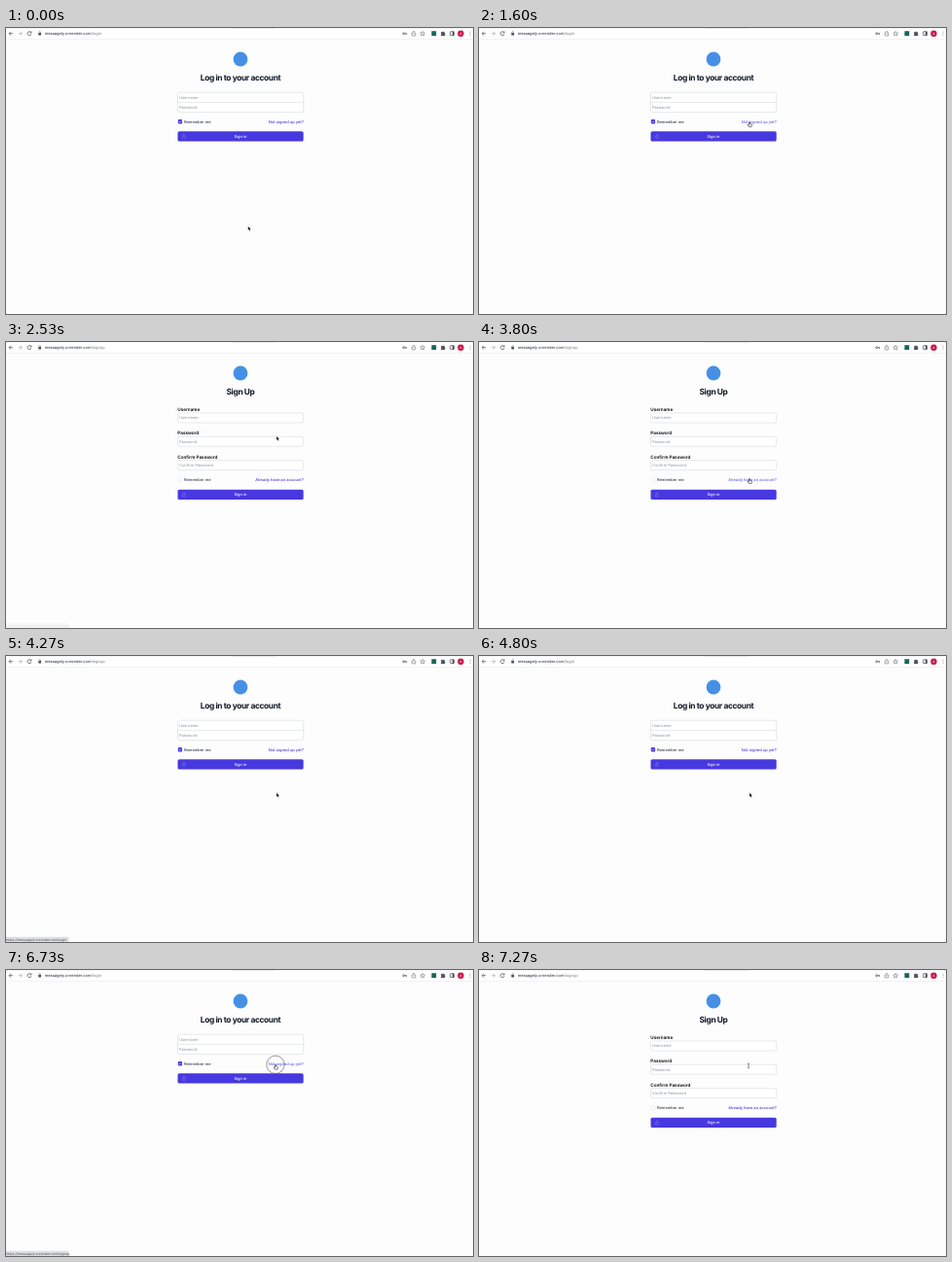
Recreate the animation shown at these times as an HTML page. Size 480 by 294 pixels, loop 7.74 s.

```html
<!DOCTYPE html>
<html lang="en">
<head>
<meta charset="utf-8">
<title>Log in and sign up</title>
<style>
  html, body { margin: 0; width: 100%; height: 100%; overflow: hidden; background: #fdfdfd; }
  svg { display: block; width: 100%; height: 100%; }
  text { font: 4.03px Inter, sans-serif; fill: #1b2130; text-rendering: geometricPrecision; }
  .title { font-size: 8.4px; font-weight: 700; letter-spacing: -.045em; text-anchor: middle; fill: #111827; }
  .label { font-size: 4.61px; font-weight: 600; fill: #000; }
  .hint { fill: #8d929c; }
  .link { font-weight: 500; fill: #4838df; text-anchor: end; }
  .button { fill: #4838df; }
  .link.hover, .button.hover { fill: #6062ef; }
  .caption { font-weight: 500; fill: #fff; text-anchor: middle; }
  .field { fill: #fff; stroke: #cdd0d6; stroke-width: .5; }
  .lock { fill: none; stroke: #7f7bf2; stroke-width: .5; }
  .icon { fill: none; stroke: #50545a; stroke-width: .75; }
  .solid { fill: #50545a; stroke: none; }
</style>
</head>
<body>
<svg viewBox="0 0 480 294">
  <rect width="480" height="294" fill="#fdfdfd"/>

  <g id="toolbar">
    <rect width="480" height="11.5" fill="#fff"/>
    <path d="M0 .3H480" stroke="#eceef0" stroke-width=".6"/>
    <path d="M232 .3H276" stroke="#d9dce0" stroke-width=".6"/>
    <path d="M0 11.6H480" stroke="#e4e5e7" stroke-width=".5"/>
    <g class="icon">
      <path d="M7 5.7H3.2M5 3.8 3.1 5.7 5 7.6"/>
      <path d="M12.6 5.7H16.4M14.6 3.8 16.5 5.7 14.6 7.6" stroke="#a9acb0"/>
      <path d="M25.6 4.4A2 2 0 1 0 26 6.2M26.1 3.4V4.9H24.5"/>
      <path d="M33.9 5.2V4.4a.8 .8 0 0 1 1.6 0V5.2" stroke-width=".5"/>
      <rect class="solid" x="33.3" y="5.1" width="2.8" height="2.5" rx=".3"/>
      <circle cx="408.7" cy="5.7" r="1"/>
      <path d="M409.7 5.7H412M411.4 5.7V6.9"/>
      <path d="M418 5H417.2V7.9H420.8V5H420M419 6.2V3.3M418 4.3 419 3.3 420 4.3" stroke-width=".5"/>
      <path d="M428.2 3.4 428.9 5 430.6 5.1 429.3 6.2 429.7 7.9 428.2 7 426.7 7.9 427.1 6.2 425.8 5.1 427.5 5Z" stroke-width=".5"/>
      <path class="solid" d="M447 4.3H448.2a.8 .8 0 0 1 1.6 0H451V5.6a.8 .8 0 0 1 0 1.5V8H447V6.7a.6 .6 0 0 0 0-1.2Z"/>
      <rect x="456.6" y="3.7" width="3.9" height="3.9" rx=".4"/>
      <path class="solid" d="M458.8 3.7H460.5V7.6H458.8Z"/>
    </g>
    <rect x="437.4" y="3.2" width="4.8" height="4.8" fill="#17665a"/>
    <circle cx="467.4" cy="5.7" r="3.2" fill="#ca1748"/>
    <text x="467.4" y="6.9" text-anchor="middle" style="font-size:3.3px;fill:#fff">A</text>
    <g class="solid"><circle cx="477" cy="4" r=".45"/><circle cx="477" cy="5.7" r=".45"/><circle cx="477" cy="7.4" r=".45"/></g>
    <text id="address" x="39.7" y="7.2"><tspan>messagely.onrender.com</tspan><tspan id="route" fill="#73777d"></tspan></text>
  </g>

  <circle cx="241" cy="32" r="7.4" fill="#4590e6"/>
  <g id="login"></g>
  <g id="signup"></g>

  <g id="status">
    <path d="M0 288.8H63.4Q64.6 288.8 64.6 290V294H0Z" fill="#dcdee2"/>
    <text id="statusText" x=".3" y="292.5" style="font-size:3.46px;fill:#4b4f55"></text>
  </g>

  <g id="pointer">
    <circle id="ring" r="9.2" fill="none" stroke="#555" stroke-width=".6"/>
    <path id="arrow" d="M0 0V4.3L1 3.4 1.7 5 2.5 4.7 1.8 3.1H3.1Z" fill="#000" stroke="#fff" stroke-width=".3"/>
    <path id="hand" d="M-.5 0Q0-.6 .5 0V1.8L2.2 2.2Q2.8 2.5 2.6 3.2L2 4.8H-.6L-2 2.9Q-1.6 2.2-.5 3Z" fill="#fff" stroke="#000" stroke-width=".5"/>
    <path id="beam" d="M-.9-1.3Q0-1.3 0-.7Q0-1.3 .9-1.3M0-.7V2.9M-.9 3.5Q0 3.5 0 2.9Q0 3.5 .9 3.5" fill="none" stroke="#333" stroke-width=".55"/>
  </g>
</svg>
<script>
const LOOP = 7740, STEP = 200 / 3;
const $ = id => document.getElementById(id);
const show = (el, on) => { el.style.display = on ? '' : 'none'; };
const clamp = v => Math.max(0, Math.min(1, v));

const text = (cls, x, y, str) => `<text class="${cls}" x="${x}" y="${y}">${str}</text>`;
const box = (cls, y, h) => `<rect class="${cls}" x="176.5" y="${y}" width="129.2" height="${h}" rx="1.6"/>`;

const labelled = (name, y) =>
  text('label', 176.3, y, name) + box('field', y + 1.9, 10) + text('hint', 178, y + 8.3, name);

// Remember-me row and the submit button, shared by both forms.
function formEnd(y, link, checked) {
  const tick = checked ? `<path d="M177.7 ${y} l.8 .8 1.5-1.7" fill="none" stroke="#fff" stroke-width=".6"/>` : '';
  return `<rect x="176.8" y="${y - 2.2}" width="4.3" height="4.3" rx=".8"
      fill="${checked ? '#4838df' : '#fff'}" stroke="${checked ? 'none' : '#d6d9de'}" stroke-width=".4"/>` + tick +
    text('', 183, y + 1.4, 'Remember me') + text('link', 305.8, y + 1.4, link) +
    box('button', y + 9.9, 10.3) + text('caption', 241, y + 16.5, 'Sign in') +
    `<g class="lock"><rect x="181.4" y="${y + 14.8}" width="3" height="2.3" rx=".3"/>
      <path d="M182 ${y + 14.8}v-.9a.9 .9 0 0 1 1.8 0v.9"/></g>`;
}

$('login').innerHTML = text('title', 241, 54.4, 'Log in to your account') +
  box('field', 66.2, 20.4) + '<path class="field" d="M176.5 76.4H305.7"/>' +
  text('hint', 178, 72.5, 'Username') + text('hint', 178, 82.8, 'Password') +
  formEnd(96.3, 'Not signed up yet?', true);

$('signup').innerHTML = text('title', 241, 54.4, 'Sign Up') +
  labelled('Username', 71.1) + labelled('Password', 95.4) + labelled('Confirm Password', 119.8) +
  formEnd(141.8, 'Already have an account?', false);

const smooth = u => u * u * (3 - 2 * u);
const easeOut = u => 1 - (1 - u) ** 2.5;
const moves = [
  { from: 800, to: 1600, x: 278, y: 96.8, ease: smooth },
  { from: 3270, to: 3800, x: 278, y: 140.6, ease: smooth },
  { from: 5530, to: 6330, x: 277, y: 97.3, ease: easeOut }
];
const hints = [
  { fadeIn: [1730, 1930], fadeOut: [2200, 2530], route: '/signup' },
  { fadeIn: [3930, 4070], fadeOut: [4530, 4800], route: '/login' },
  { fadeIn: [6400, 6530], fadeOut: [7000, 7270], route: '/signup' }
];
const ramp = (t, [a, b]) => clamp((t - a) / (b - a));
const within = (t, a, b) => t >= a && t < b;

function pointerAt(t) {
  let x = 248.8, y = 203.8;
  for (const m of moves) {
    const u = m.ease(ramp(t, [m.from, m.to]));
    x += (m.x - x) * u;
    y += (m.y - y) * u;
  }
  return { x, y };
}

function targetAt(t, { x, y }, signup) {
  // A new page keeps the plain arrow until the mouse moves again.
  if (within(t, 2070, 3330) || within(t, 4270, 5600)) return '';
  if (signup) {
    if (y > 138.5) return 'link';
    return within(y, 97, 107.5) || within(y, 121.5, 132) ? 'field' : '';
  }
  if (x > 269.5 && within(y, 93.5, 99.5)) return 'link';
  return within(y, 106, 116.5) ? 'button' : '';
}

function draw(t) {
  const signup = within(t, 2070, 4270) || t >= 6800;
  show($('login'), !signup);
  show($('signup'), signup);
  $('route').textContent = within(t, 2130, 4330) || t >= 6800 ? '/signup' : '/login';

  const p = pointerAt(t), target = targetAt(t, p, signup);
  $('pointer').setAttribute('transform', `translate(${p.x} ${p.y})`);
  show($('pointer'), !within(t, 6730, 6800));
  show($('arrow'), !target);
  show($('hand'), target === 'link' || target === 'button');
  show($('beam'), target === 'field');
  show($('ring'), within(t, 1930, 2070) || within(t, 4130, 4270) || within(t, 6670, 6730));
  for (const name of ['link', 'button'])
    for (const el of document.querySelectorAll('.' + name))
      el.classList.toggle('hover', target === name && !within(t, 6730, 6800));

  const hint = hints.find(h => t < h.fadeOut[1]) || hints[2];
  $('statusText').textContent = 'https://messagely.onrender.com' + hint.route;
  $('status').setAttribute('opacity', ramp(t, hint.fadeIn) * (1 - ramp(t, hint.fadeOut)));
}

function tick() {
  // The picture advances in fifteenths of a second.
  draw(Math.floor(performance.now() % LOOP / STEP) * STEP + 5);
  requestAnimationFrame(tick);
}
tick();
</script>
</body>
</html>
```
